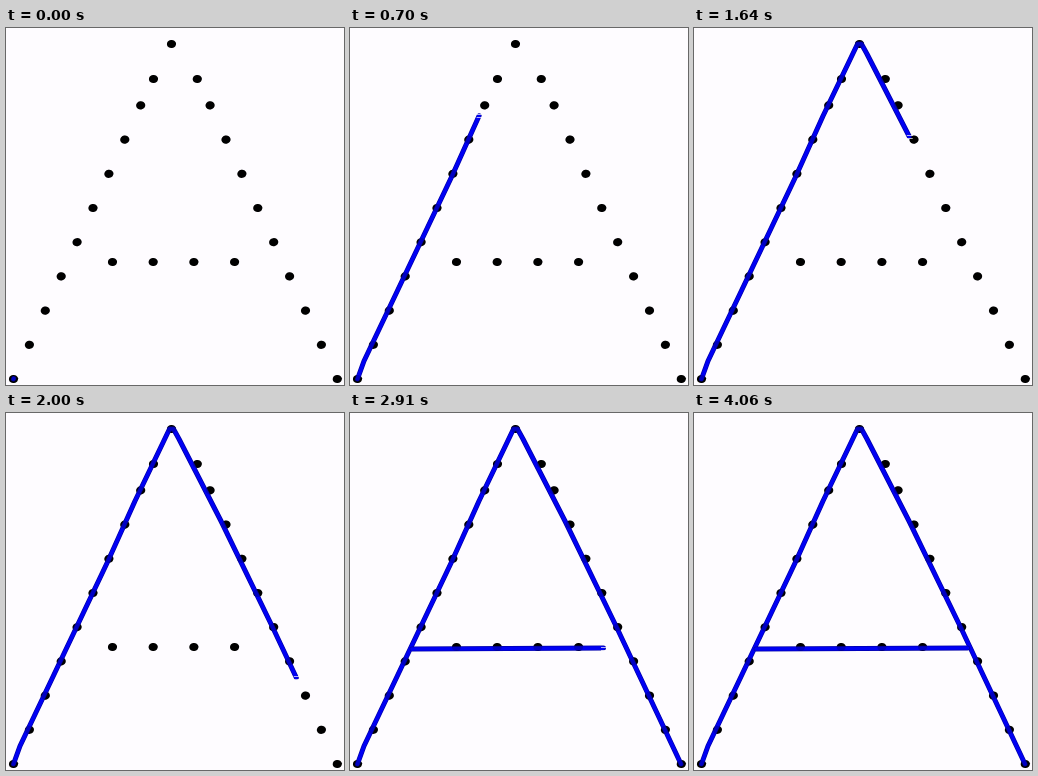
An HTML page with a canvas for the animation above (4090 ms loop, 338 px wide and 357 px high).

```html
<!DOCTYPE html>
<html lang="en">
<head>
<meta charset="utf-8">
<title>Tracing the letter A</title>
<style>
html, body { margin: 0; width: 100%; height: 100%; overflow: hidden; background: #fefcff; }
canvas { display: block; }
</style>
</head>
<body>
<canvas id="stage" width="338" height="357"></canvas>
<script>
const ctx = document.getElementById('stage').getContext('2d');
const LOOP = 4090;
const PAPER = '#fefcff';

const row = (count, x, y, dx, dy) =>
  Array.from({ length: count }, (_, i) => [x + dx * i, y + dy * i]);

// Evenly spaced dots; the right leg mirrors the left one.
const leg = [...row(9, 7.5, 351, 15.9, -34.2), [147.5, 51]];
const dots = [
  ...leg,
  ...leg.map(([x, y]) => [338.8 - x, y]),
  [165.5, 16],
  ...row(4, 106.5, 234, 40.7, 0)
];

// Pen strokes as key points [x, y, time in ms]
const strokes = [
  [[7.5, 351, 0], [14, 333, 45], [102, 148, 550], [129, 88, 700], [163.5, 16, 1040],
   [167.5, 16, 1110], [173, 26, 1180], [215, 108, 1640], [266.5, 214, 1885], [331, 351, 2200]],
  [[62, 236, 2422], [273.5, 235, 2962]]
];

function drawDots() {
  ctx.fillStyle = '#000';
  for (const [x, y] of dots) {
    ctx.beginPath();
    ctx.ellipse(x, y, 4.6, 4.1, -0.15, 0, Math.PI * 2);
    ctx.fill();
  }
}

function ink(color, width) {
  ctx.strokeStyle = color;
  ctx.lineWidth = width;
  ctx.stroke();
}

// Draws the part of a stroke finished by time t and returns the moving tip.
function drawStroke(points, t) {
  if (t < points[0][2]) return null;
  let tip = null;
  ctx.beginPath();
  ctx.moveTo(points[0][0], points[0][1]);
  for (let i = 1; i < points.length && !tip; i++) {
    const [ax, ay, at] = points[i - 1];
    const [bx, by, bt] = points[i];
    const k = Math.min(1, (t - at) / (bt - at));
    const x = ax + (bx - ax) * k, y = ay + (by - ay) * k;
    ctx.lineTo(x, y);
    if (k < 1) tip = [x, y];
  }
  ink('#0000a8', 5);
  ink('#0000f4', 3.6);
  return tip;
}

function drawTip([x, y]) {
  ctx.fillStyle = PAPER;
  for (const dy of [-1.5, 1.5]) ctx.fillRect(x - 2.5, Math.round(y + dy), 6, 1);
}

function render(t) {
  ctx.fillStyle = PAPER;
  ctx.fillRect(0, 0, 338, 357);
  drawDots();
  ctx.lineCap = ctx.lineJoin = 'round';
  const tips = strokes.map(s => drawStroke(s, t));
  // Dots show faintly through the ink.
  ctx.globalAlpha = 0.2;
  drawDots();
  ctx.globalAlpha = 0.7;
  if (t > 30) tips.filter(Boolean).forEach(drawTip);
  ctx.globalAlpha = 1;
}

const start = performance.now();
function tick() {
  render((performance.now() - start) % LOOP);
  requestAnimationFrame(tick);
}
tick();
</script>
</body>
</html>
```
